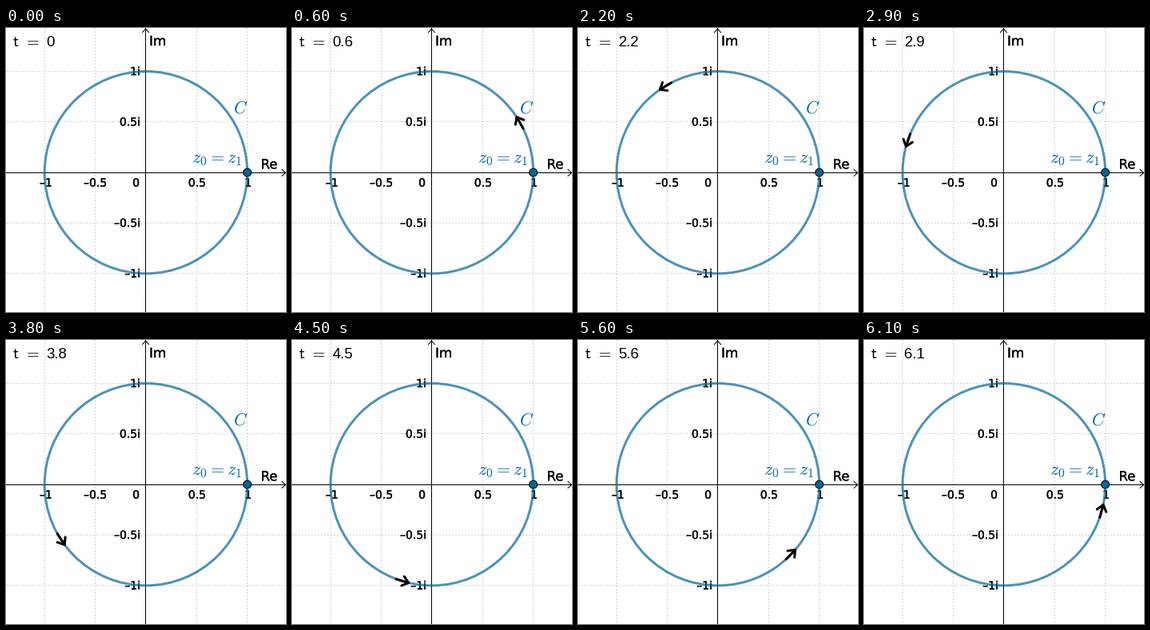
Recreate the animation shown at these times as a matplotlib script. Size 350 by 356 pixels, loop 6.2 s.

```python
import numpy as np
import matplotlib.pyplot as plt
from matplotlib.animation import FuncAnimation
from matplotlib.patches import Circle
from matplotlib.patheffects import withStroke

W, H, DPI = 350, 356, 100
PX = 72 / DPI                      # points per pixel
CX, CY, UNIT = 174.9, 181.1, 126.7
BLUE = "#006699"
TAIL, TIP = 0.15, 0.02             # arrow ends behind t, in radians
FRAMES, STEP = 62, 100

plt.rcParams["font.family"] = "DejaVu Sans"
plt.rcParams["mathtext.fontset"] = "cm"

fig = plt.figure(figsize=(W / DPI, H / DPI), dpi=DPI, facecolor="white")
ax = fig.add_axes([0, 0, 1, 1])
ax.set_xlim(0, W)
ax.set_ylim(H, 0)
ax.axis("off")


def line(xs, ys, width=1, color="black", **kw):
    return ax.plot(xs, ys, color=color, lw=width * PX, snap=False, **kw)[0]


def text(x, y, s, size, color="black", ha="left", **kw):
    return ax.text(x, y, s, fontsize=size * PX, color=color, ha=ha,
                   va="baseline", **kw)


def label(x, y, s, size, ha="left"):
    """Axis text, slightly thickened."""
    stroke = withStroke(linewidth=0.3 * PX, foreground="black")
    return text(x, y, s, size, ha=ha, zorder=2, path_effects=[stroke])


def crisp(v):
    """Centre of the pixel that holds v."""
    return np.floor(v) + 0.5


def on_circle(angle):
    return np.array([CX + UNIT * np.cos(angle), CY - UNIT * np.sin(angle)])


# Grid
grid = dict(color="#d4d4d4", dashes=(2, 2), dash_capstyle="butt", zorder=1)
for k in (-1, -0.5, 0.5, 1):
    x, y = crisp(CX + k * UNIT), crisp(CY - k * UNIT)
    line([x, x], [0, H], **grid)
    line([0, W], [y, y], **grid)

# Axes with open arrowheads
ox, oy = crisp(CX), crisp(CY)
line([0, W], [oy, oy], zorder=2)
line([ox, ox], [0, H], zorder=2)
line([W - 5, W - 0.5, W - 5], [oy - 4, oy, oy + 4], zorder=2)
line([ox - 4, ox, ox + 4], [5.5, 1, 5.5], zorder=2)

# Tick labels
for x, s in ((49.8, "–1"), (111.5, "–0.5"), (162.5, "0"),
             (238.8, "0.5"), (302.6, "1")):
    label(x, 198.7, s, 14, ha="center")
for k, s in ((1, "1i"), (0.5, "0.5i"), (-0.5, "–0.5i"), (-1, "–1i")):
    label(168, CY - k * UNIT + 4.7, s, 14, ha="right")
label(318.5, 176.3, "Re", 16.5)
label(179, 22, "Im", 16.8)

# Curve, end point and their labels
ax.add_patch(Circle((CX, CY), UNIT, fill=False, ec=BLUE, lw=3 * PX,
                    alpha=0.7, zorder=3))
ax.add_patch(Circle((CX + UNIT, CY), 5, fc=BLUE, ec="black", lw=PX, zorder=6))
text(284.3, 106.5, "$C$", 21.5, BLUE, zorder=4)
text(231.8, 169, "$z_0 = z_1$", 22, BLUE, zorder=4)

# Time readout
text(7.5, 23, r"$\mathsf{t}$", 20)
text(22.5, 22.3, r"$\mathsf{=}$", 20)
value = text(50.3, 23, "", 18.7, family="Liberation Sans")

# Moving arrow
ink = dict(width=3, zorder=5, solid_capstyle="round", solid_joinstyle="round")
shaft = line([], [], **ink)
head = line([], [], **ink)


def update(i):
    t = i / 10
    value.set_text(f"{t:g}")
    visible = i > 0
    shaft.set_visible(visible)
    head.set_visible(visible)
    if visible:
        tail, tip = on_circle(max(0, t - TAIL)), on_circle(t - TIP)
        back = (tail - tip) / np.hypot(*(tail - tip))
        side = np.array([-back[1], back[0]])
        wings = [tip + 7.5 * back + s * 6 * side for s in (-1, 1)]
        shaft.set_data(*zip(tail, tip))
        head.set_data(*zip(wings[0], tip, wings[1]))
    return value, shaft, head


anim = FuncAnimation(fig, update, frames=FRAMES, interval=STEP,
                     repeat=True, repeat_delay=0, blit=False)
plt.show()
```
